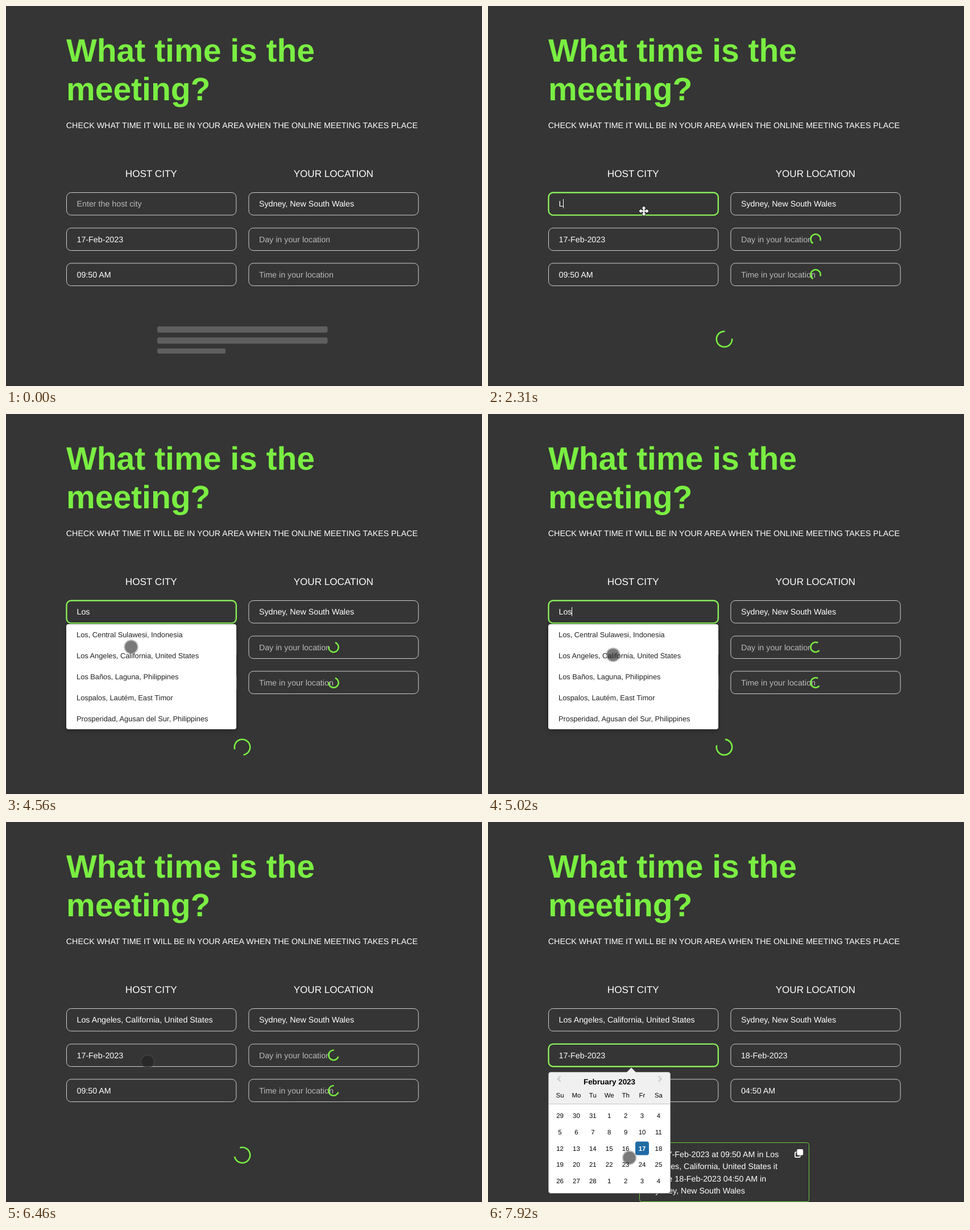
An HTML page with a canvas for the animation above (7990 ms loop, 837 px wide and 669 px high).

```html
<!DOCTYPE html>
<html lang="en">
<head>
<meta charset="utf-8">
<title>Meeting time</title>
<style>
  html, body { margin: 0; width: 100%; height: 100%; overflow: hidden; background: #353535; }
  canvas { display: block; }
</style>
</head>
<body>
<canvas id="stage" width="837" height="669"></canvas>
<script>
const ctx = document.getElementById('stage').getContext('2d');
const LOOP = 7990, STEP = 68, START = 270;
const GREEN = '#7aee42', WHITE = '#fff', MUTED = '#b9b9b9', LINE = '#cfcfcf';
const REM = 14.25;
const LEFT = 106.5, RIGHT = 426.9, ROWS = [328.5, 390.9, 452.9];

// Moments when the interface changes
const AT = {
  press: 1290, focus: 1420, icon: 2110, type: 2310, iconEnd: 3190, list: 4085,
  pick: 5030, picked: 5235, result: 6790, datePress: 7060, calendar: 7390
};
const TYPED = [[2310, 'L'], [2582, 'Lo'], [2854, 'Los']];
const CITY = 'Los Angeles, California, United States';
const SUGGESTIONS = [
  'Los, Central Sulawesi, Indonesia', CITY, 'Los Baños, Laguna, Philippines',
  'Lospalos, Lautém, East Timor', 'Prosperidad, Agusan del Sur, Philippines'
];
const SUMMARY = [
  'On 17-Feb-2023 at 09:50 AM in Los', 'Angeles, California, United States it',
  'will be 18-Feb-2023 04:50 AM in', 'Sydney, New South Wales'
];
// Pointer path: time, x, y
const PATH = [
  [270, 682, 594], [1020, 274, 361], [4085, 274, 361], [4550, 220, 410],
  [4850, 220, 424], [5700, 220, 424], [6000, 204, 427], [6330, 249, 422],
  [7585, 249, 422], [7720, 218, 417], [7910, 250, 599]
];

const within = (t, from, to) => t >= from && t < to;

function text(str, x, y, size = REM, color = WHITE, align = 'left', weight = 'normal') {
  ctx.font = `${weight} ${size}px "Liberation Sans", Arial, sans-serif`;
  ctx.fillStyle = color;
  ctx.textAlign = align;
  ctx.fillText(str, x, y);
}

function box(x, y, w, h, r, fill, stroke, width = 1) {
  ctx.beginPath();
  ctx.roundRect(x, y, w, h, r);
  if (fill) { ctx.fillStyle = fill; ctx.fill(); }
  if (stroke) { ctx.strokeStyle = stroke; ctx.lineWidth = width; ctx.stroke(); }
}

function polyline(points, color, width) {
  ctx.beginPath();
  points.forEach(([x, y]) => ctx.lineTo(x, y));
  ctx.strokeStyle = color;
  ctx.lineWidth = width;
  ctx.stroke();
}

function disc(x, y, r, color) {
  ctx.beginPath();
  ctx.arc(x, y, r, 0, 7);
  ctx.fillStyle = color;
  ctx.fill();
}

function field(x, row, value, placeholder, focused) {
  const y = ROWS[row];
  if (focused) box(x, y, 298.3, 39.6, 8, null, GREEN, 2.4);
  box(x, y, 298.3, 39.6, 8, null, focused ? '#b5efa0' : LINE, focused ? 0.6 : 1);
  text(value || placeholder, x + 18, y + 24.6, REM, value ? WHITE : MUTED);
}

function spinner(x, y, r, gapCenter, gapHalf) {
  ctx.beginPath();
  ctx.arc(x, y, r, gapCenter + gapHalf, gapCenter - gapHalf + 2 * Math.PI);
  ctx.strokeStyle = GREEN;
  ctx.lineWidth = 2.6;
  ctx.stroke();
}

function spinners(t) {
  const angle = (t - AT.type) / 1530 * 2 * Math.PI - Math.PI / 4;
  spinner(415.5, 586.5, 13.7, angle, 0.72);
  for (const y of [410.5, 473]) spinner(576, y, 8.7, angle + 2, 0.9);
}

function skeleton() {
  box(266, 564, 299.5, 11, 3, '#5f5f5f');
  box(266, 583.5, 299.5, 11, 3, '#5f5f5f');
  box(266, 603, 120, 9, 3, '#5f5f5f');
}

function summary() {
  box(266.5, 564.5, 298, 104, 4, null, '#6ccb40');
  SUMMARY.forEach((line, i) => text(line, 284.7, 589.8 + i * 21.35));
  box(539.9, 581.1, 9, 9, 2, null, WHITE, 1.8);
  box(542.4, 575.2, 12.4, 12.4, 2, '#353535');
  box(543.3, 576, 10.8, 10.8, 2, WHITE);
}

function suggestions() {
  ctx.save();
  ctx.shadowColor = 'rgba(0,0,0,.3)';
  ctx.shadowBlur = 8;
  ctx.shadowOffsetY = 2;
  box(106, 370, 299, 185, 4, WHITE);
  ctx.restore();
  SUGGESTIONS.forEach((s, i) => text(s, 124, 392.6 + i * 37, REM * 0.9, '#222'));
}

function calendar() {
  const column = i => 126.5 + i * 28.9;
  const small = REM * 0.8;
  box(106.5, 440.5, 214, 213, 4, WHITE, '#aeaeae');
  box(107, 441, 213, 56, [4, 4, 0, 0], '#f0f0f0');
  polyline([[107, 496.5], [320, 496.5]], '#c4c4c4', 1);
  ctx.beginPath();
  [[243.5, 441], [252, 432.5], [260.5, 441]].forEach(p => ctx.lineTo(...p));
  ctx.fillStyle = '#f0f0f0';
  ctx.fill();
  text('February 2023', 213.5, 462, 13.45, '#000', 'center', 'bold');
  polyline([[127.5, 447.5], [122.8, 452.2], [127.5, 456.9]], '#ccc', 2.4);
  polyline([[299.8, 447.5], [304.5, 452.2], [299.8, 456.9]], '#ccc', 2.4);
  ['Su', 'Mo', 'Tu', 'We', 'Th', 'Fr', 'Sa'].forEach((d, i) =>
    text(d, column(i), 485, small, '#000', 'center'));
  for (let i = 0; i < 35; i++) {
    const day = new Date(2023, 0, 29 + i);
    const x = column(i % 7), y = 521 + Math.floor(i / 7) * 28.75;
    const chosen = day.getMonth() === 1 && day.getDate() === 17;
    if (chosen) box(259, 562.5, 24, 24, 4, '#216ba5');
    text(day.getDate(), x, y, small, chosen ? WHITE : '#000', 'center', chosen ? 'bold' : 'normal');
  }
}

function pointerAt(t) {
  const next = PATH.findIndex(p => p[0] > t);
  if (next < 0) return PATH[PATH.length - 1].slice(1);
  const [t0, x0, y0] = PATH[next - 1], [t1, x1, y1] = PATH[next];
  const k = (t - t0) / (t1 - t0), e = k * k * (3 - 2 * k);
  return [x0 + (x1 - x0) * e, y0 + (y1 - y0) * e];
}

function moveIcon(x, y) {
  ctx.save();
  ctx.translate(x, y);
  for (let i = 0; i < 4; i++) {
    ctx.beginPath();
    [[-1.5, -1.5], [-1.5, -4.5], [-4, -4.5], [0, -8.8], [4, -4.5], [1.5, -4.5], [1.5, -1.5]]
      .forEach(p => ctx.lineTo(...p));
    ctx.fillStyle = WHITE;
    ctx.strokeStyle = '#000';
    ctx.lineWidth = 1.2;
    ctx.stroke();
    ctx.fill();
    ctx.rotate(Math.PI / 2);
  }
  ctx.fillStyle = WHITE;
  ctx.fillRect(-1.5, -1.5, 3, 3);
  ctx.restore();
}

function pointer(t, stepped) {
  if (t < START) return;
  const [x, y] = pointerAt(Math.max(START, stepped));
  const pressed = within(t, AT.press, AT.focus) || within(t, AT.pick, AT.picked) ||
    within(t, AT.datePress, AT.calendar);
  if (within(t, AT.icon, AT.iconEnd)) return moveIcon(x, y);
  if (pressed) {
    disc(x, y, 13.7, 'rgba(190,190,24,.72)');
    disc(x, y, 11, 'rgba(120,120,0,.45)');
  } else {
    disc(x, y, 12.7, 'rgba(84,84,84,.38)');
    disc(x, y, 10.8, 'rgba(0,0,0,.36)');
  }
}

function hostCaret(t, typed) {
  const last = TYPED.filter(k => k[0] <= t).pop();
  const since = t - (last ? last[0] : AT.focus - 10);
  if (since % 1000 >= 500) return;
  ctx.font = `${REM}px "Liberation Sans", Arial, sans-serif`;
  ctx.fillStyle = WHITE;
  ctx.fillRect(Math.round(124.5 + ctx.measureText(typed).width), 340, 1, 16);
}

function draw(t) {
  const stepped = START + Math.floor((t - START) / STEP + 0.15) * STEP;
  const editing = within(t, AT.focus, AT.picked);
  const typed = (TYPED.filter(k => k[0] <= t).pop() || [0, ''])[1];
  const done = t >= AT.result, dated = t >= AT.calendar;

  ctx.textRendering = 'geometricPrecision';
  ctx.fillStyle = '#353535';
  ctx.fillRect(0, 0, 837, 669);
  ctx.fillStyle = '#2c2c2c';
  ctx.fillRect(0, 668, 837, 1);

  text('What time is the', 106, 97.5, REM * 4, GREEN, 'left', 'bold');
  text('meeting?', 106, 166, REM * 4, GREEN, 'left', 'bold');
  text('CHECK WHAT TIME IT WILL BE IN YOUR AREA WHEN THE ONLINE MEETING TAKES PLACE', 105.8, 215.3);
  text('HOST CITY', 255.3, 301.3, REM * 1.2, WHITE, 'center');
  text('YOUR LOCATION', 575.8, 301.3, REM * 1.2, WHITE, 'center');

  field(LEFT, 0, t >= AT.picked ? CITY : typed, 'Enter the host city', editing);
  field(LEFT, 1, '17-Feb-2023', '', dated);
  field(LEFT, 2, '09:50 AM');
  field(RIGHT, 0, 'Sydney, New South Wales');
  field(RIGHT, 1, done && '18-Feb-2023', 'Day in your location');
  field(RIGHT, 2, done && '04:50 AM', 'Time in your location');

  if (editing) hostCaret(t, typed);
  if (done) summary();
  else if (t >= AT.type) spinners(stepped);
  else skeleton();
  if (within(t, AT.list, AT.picked)) suggestions();
  if (dated) calendar();
  pointer(t, stepped);
}

function tick() {
  draw(performance.now() % LOOP);
  requestAnimationFrame(tick);
}
tick();
</script>
</body>
</html>
```
